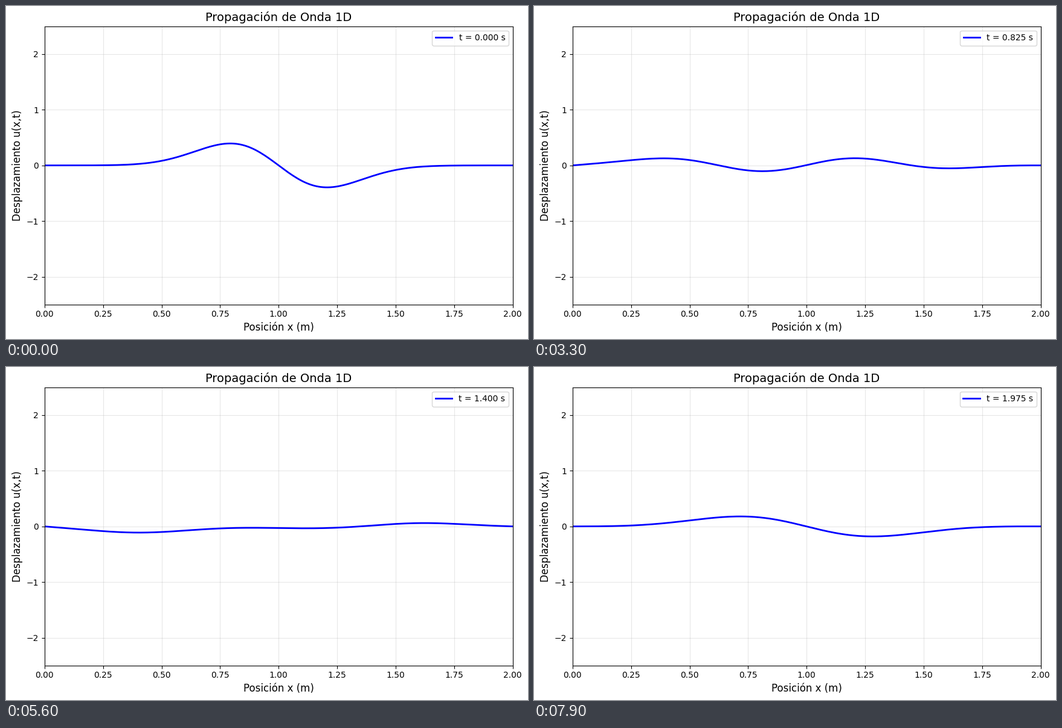
Recreate the animation shown at these times as a matplotlib script. Size 864 px wide and 553 px high, loop 8000 ms.

```python
import numpy as np
import matplotlib.pyplot as plt
from matplotlib.animation import FuncAnimation

W, H, DPI = 864, 553, 100
AX_W, AX_H, PAD = 775, 462, 10
FRAMES, INTERVAL, DT = 80, 100, 0.025

# u_tt = c^2 u_xx + NU u_xxt + sin(pi x - OMEGA t), fixed ends, released at rest
LENGTH, C, NU, OMEGA = 2.0, 2.0, 0.02, 2 * np.pi
MODES = 40

x = np.linspace(0, LENGTH, 201)
k = np.arange(1, MODES + 1) * np.pi / LENGTH
shapes = np.sin(np.outer(x, k))


def project(f):
    """Sine coefficients of f on the string."""
    s = np.linspace(0, LENGTH, 4001)
    return np.sin(np.outer(k, s)) @ f(s) * (s[1] - s[0]) * 2 / LENGTH


start = project(lambda s: np.sin(np.pi * s) * np.exp(-10 * (s - 1) ** 2))
force = project(lambda s: np.exp(1j * np.pi * s))

rate = NU * k**2 / 2
omega = C * k
omega_d = np.sqrt(omega**2 - rate**2)
driven = force / (omega**2 - OMEGA**2 - 2j * rate * OMEGA)

# Free part cancels the driven displacement and velocity at t = 0
free_cos = start - driven.imag
free_sin = (rate * free_cos - (-1j * OMEGA * driven).imag) / omega_d


def wave(t):
    free = np.exp(-rate * t) * (free_cos * np.cos(omega_d * t)
                                + free_sin * np.sin(omega_d * t))
    return shapes @ (free + (driven * np.exp(-1j * OMEGA * t)).imag)


def place(ax, left, bottom):
    ax.set_position([left / W, bottom / H, AX_W / W, AX_H / H])


fig = plt.figure(figsize=(W / DPI, H / DPI), dpi=DPI, facecolor="white")
ax = fig.add_subplot()
line, = ax.plot(x, wave(0), "b-", lw=2, label="t = 0.000 s")
ax.set_xlim(0, LENGTH)
ax.set_ylim(-2.5, 2.5)
ax.set_title("Propagación de Onda 1D", fontsize=14)
ax.set_xlabel("Posición x (m)", fontsize=12)
ax.set_ylabel("Desplazamiento u(x,t)", fontsize=12)
ax.grid(True, alpha=0.3)
label = ax.legend(loc="upper right").get_texts()[0]

# Shift the axes so that the labels keep a margin of PAD at left and bottom
left, bottom = 125, 66
place(ax, left, bottom)
fig.draw_without_rendering()
tight = fig.get_tightbbox()
place(ax, left - tight.x0 * DPI + PAD, bottom - tight.y0 * DPI + PAD)


def update(i):
    t = i * DT
    line.set_ydata(wave(t))
    label.set_text(f"t = {t:.3f} s")
    return line, label


anim = FuncAnimation(fig, update, frames=FRAMES, interval=INTERVAL,
                     repeat=True, repeat_delay=0, blit=False)
plt.show()
```
